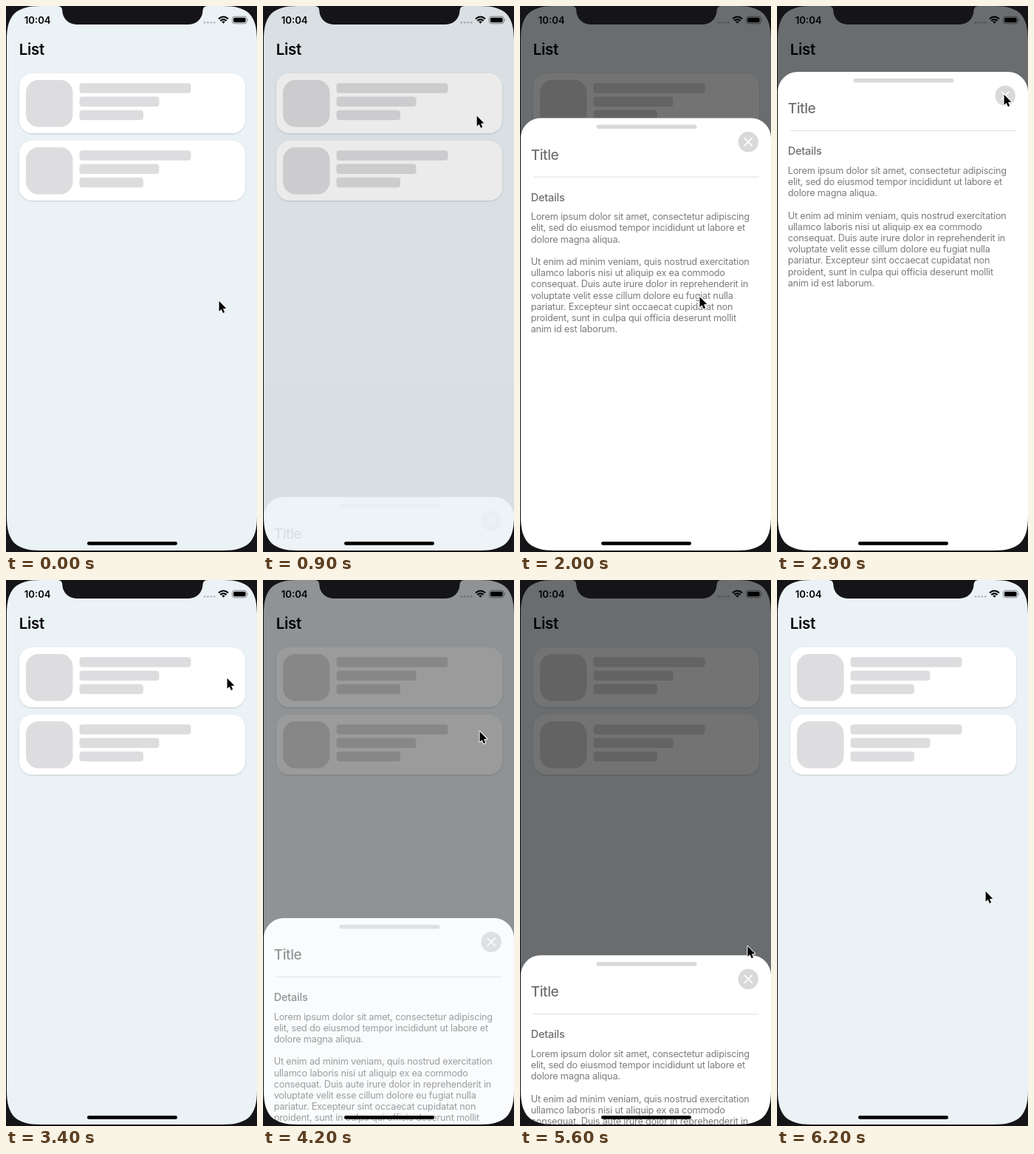
Write an HTML page that moves like this. It is 340 px wide and 738 px high and loops after 6300 ms.

```html
<!DOCTYPE html>
<html lang="en">
<head>
<meta charset="utf-8">
<title>Bottom sheet</title>
<style>
  html, body { margin: 0; width: 100%; height: 100%; overflow: hidden; background: #151416; }
  svg { display: block; width: 100vw; height: 100vh; font-family: Inter, "Liberation Sans", sans-serif; }
  .time { font-size: 13.2px; font-weight: 600; }
  .head { font-size: 20.5px; font-weight: 600; letter-spacing: -.3px; }
  .title { font-size: 19px; font-weight: 500; letter-spacing: -.4px; fill: #707070; }
  .sub { font-size: 14.5px; font-weight: 500; letter-spacing: -.2px; fill: #6f6f6f; }
  .body { font-size: 12.7px; letter-spacing: -.2px; fill: #7c7c7c; }
</style>
</head>
<body>
<svg viewBox="0 0 340 738">
  <defs>
    <filter id="shade" x="-5%" y="-10%" width="110%" height="125%">
      <feDropShadow dx="0" dy="1" stdDeviation="1" flood-color="#000" flood-opacity=".16"/>
    </filter>
    <g id="card">
      <rect x="18" y="91" width="306" height="81" rx="18" fill="#fff" filter="url(#shade)"/>
      <g fill="#dddddf">
        <rect x="27" y="100" width="63.5" height="63.5" rx="17"/>
        <rect x="99.5" y="104.3" width="151" height="13.5" rx="4"/>
        <rect x="99.5" y="122.6" width="108" height="13.5" rx="4"/>
        <rect x="99.5" y="140.8" width="86.5" height="13.5" rx="4"/>
      </g>
    </g>
  </defs>

  <rect width="340" height="738" fill="#ebf2f6"/>
  <text class="time" x="24.7" y="23.7">10:04</text>
  <g fill="#b6babd">
    <circle cx="269" cy="22.3" r="1.4"/><circle cx="273.4" cy="22.3" r="1.4"/>
    <circle cx="277.8" cy="22.3" r="1.4"/><circle cx="282.2" cy="22.3" r="1.4"/>
  </g>
  <g fill="none" stroke="#000" stroke-width="2.1">
    <path d="M288 17.4Q294.5 11.6 301 17.4M290.3 20Q294.5 16.4 298.7 20"/>
    <path d="M292.2 21.3Q294.5 19.7 296.8 21.3L294.5 23.8z" fill="#000" stroke="none"/>
  </g>
  <rect x="306.5" y="14.2" width="19.6" height="9.6" rx="3" fill="none" stroke="#000" stroke-opacity=".45"/>
  <rect x="308" y="15.7" width="16.6" height="6.6" rx="1.7"/>
  <path d="M327.2 17.2Q329 19 327.2 20.8z" fill-opacity=".5"/>
  <text class="head" x="17.7" y="66">List</text>
  <use href="#card"/>
  <use href="#card" y="91"/>

  <g id="modal">
    <rect width="340" height="738" fill="#000" fill-opacity=".55"/>
    <g id="sheet">
      <rect x="1" width="339" height="900" rx="27" fill="#fff"/>
      <rect x="103.5" y="9" width="136" height="5.4" rx="2.7" fill="#d9d9db"/>
      <circle cx="309.2" cy="32.2" r="13.7" fill="#d9d9db"/>
      <path d="M304.2 27.2l10 10m0-10l-10 10" stroke="#fff" stroke-width="1.7" stroke-linecap="round"/>
      <text class="title" x="14.7" y="56">Title</text>
      <rect x="18" y="79" width="305.5" height="1" fill="#dfdfe0"/>
      <text class="sub" x="14.7" y="112.2">Details</text>
      <g class="body" id="copy"></g>
    </g>
  </g>

  <rect x="110" y="724" width="122" height="4.8" rx="2.4"/>
  <path fill="#151416" fill-rule="evenodd" d="M0 0H340V738H0zM47 0H70Q76 0 76.3 6A19 19 0 0 0 95.5 25H247.5A19 19 0 0 0 266.5 6Q267 0 273 0H294C327.7 0 340 12.3 340 46V690C340 723.7 327.7 736 294 736H47C13.3 736 1 723.7 1 690V46C1 12.3 13.3 0 47 0z"/>
  <path id="cursor" d="M-.4 .8v14l3.1-2.8 2.2 5 2.3-1-2.1-4.9 4.3-.3z" stroke="#fff" stroke-width="2" stroke-linejoin="round" paint-order="stroke"/>
</svg>

<script>
const LOOP = 6300, STEP = 100;
const HIDDEN = 738, HALF = 463, FULL = 89;
const OPEN1 = 850, DRAG = 1500, RELEASE = 1900, CLOSE1 = 3064, OPEN2 = 3950, CLOSE2 = 5564;

const COPY = [
  'Lorem ipsum dolor sit amet, consectetur adipiscing',
  'elit, sed do eiusmod tempor incididunt ut labore et',
  'dolore magna aliqua.',
  '',
  'Ut enim ad minim veniam, quis nostrud exercitation',
  'ullamco laboris nisi ut aliquip ex ea commodo',
  'consequat. Duis aute irure dolor in reprehenderit in',
  'voluptate velit esse cillum dolore eu fugiat nulla',
  'pariatur. Excepteur sint occaecat cupidatat non',
  'proident, sunt in culpa qui officia deserunt mollit',
  'anim id est laborum.'
];

// Pointer stops: time, x, y
const STOPS = [
  [0, 289, 398], [700, 291, 140], [OPEN1, 291, 140], [DRAG, 236, 595],
  [RELEASE, 242, 400], [2900, 308, 119], [3050, 308, 119], [3400, 300, 132],
  [3600, 294, 204], [4200, 294, 204], [4900, 309, 495], [CLOSE2, 309, 495],
  [6200, 283, 420], [LOOP, 283, 420]
];

const $ = id => document.getElementById(id);
const modal = $('modal'), sheet = $('sheet'), cursor = $('cursor');
$('copy').innerHTML = COPY.map((line, i) =>
  `<text x="14.7" y="${(137.7 + i * 15.2).toFixed(1)}">${line}</text>`).join('');

const ramp = (t, a, b) => Math.min(1, Math.max(0, (t - a) / (b - a)));
const smooth = u => u * u * (3 - 2 * u);
const mix = (a, b, u) => a + (b - a) * u;

function spring(t, start, from, to) {
  const s = Math.max(0, t - start) / 1000, decay = 14.5, freq = 12;
  const swing = Math.cos(freq * s) + decay / freq * Math.sin(freq * s);
  return mix(to, from, Math.exp(-decay * s) * swing);
}

function pointer(t) {
  const i = STOPS.findIndex(p => p[0] > t);
  const [a, b] = [STOPS[i - 1], STOPS[i]];
  const u = smooth(ramp(t, a[0], b[0]));
  return [mix(a[1], b[1], u), mix(a[2], b[2], u)];
}

function sheetTop(t, pointerY) {
  if (t < DRAG) return spring(t, OPEN1, HIDDEN, HALF);
  if (t < RELEASE) return HALF + pointerY - 595;
  if (t < CLOSE1) return spring(t, RELEASE, 268, FULL);
  if (t < OPEN2) return spring(t, CLOSE1, FULL, HIDDEN);
  if (t < CLOSE2) return spring(t, OPEN2, HIDDEN, HALF);
  return spring(t, CLOSE2, HALF, HIDDEN);
}

function draw(t) {
  const [x, y] = pointer(t);
  const alpha = ramp(t, OPEN1, OPEN1 + 350) - ramp(t, 3100, 3360)
              + ramp(t, OPEN2, OPEN2 + 350) - ramp(t, 5600, 5860);
  modal.setAttribute('opacity', alpha);
  sheet.setAttribute('transform', `translate(0 ${sheetTop(t, y)})`);
  cursor.setAttribute('transform', `translate(${x} ${y})`);
}

const begin = performance.now();
function tick() {
  const t = (performance.now() - begin) % LOOP;
  draw(Math.floor(t / STEP) * STEP);
  requestAnimationFrame(tick);
}
tick();
</script>
</body>
</html>
```
